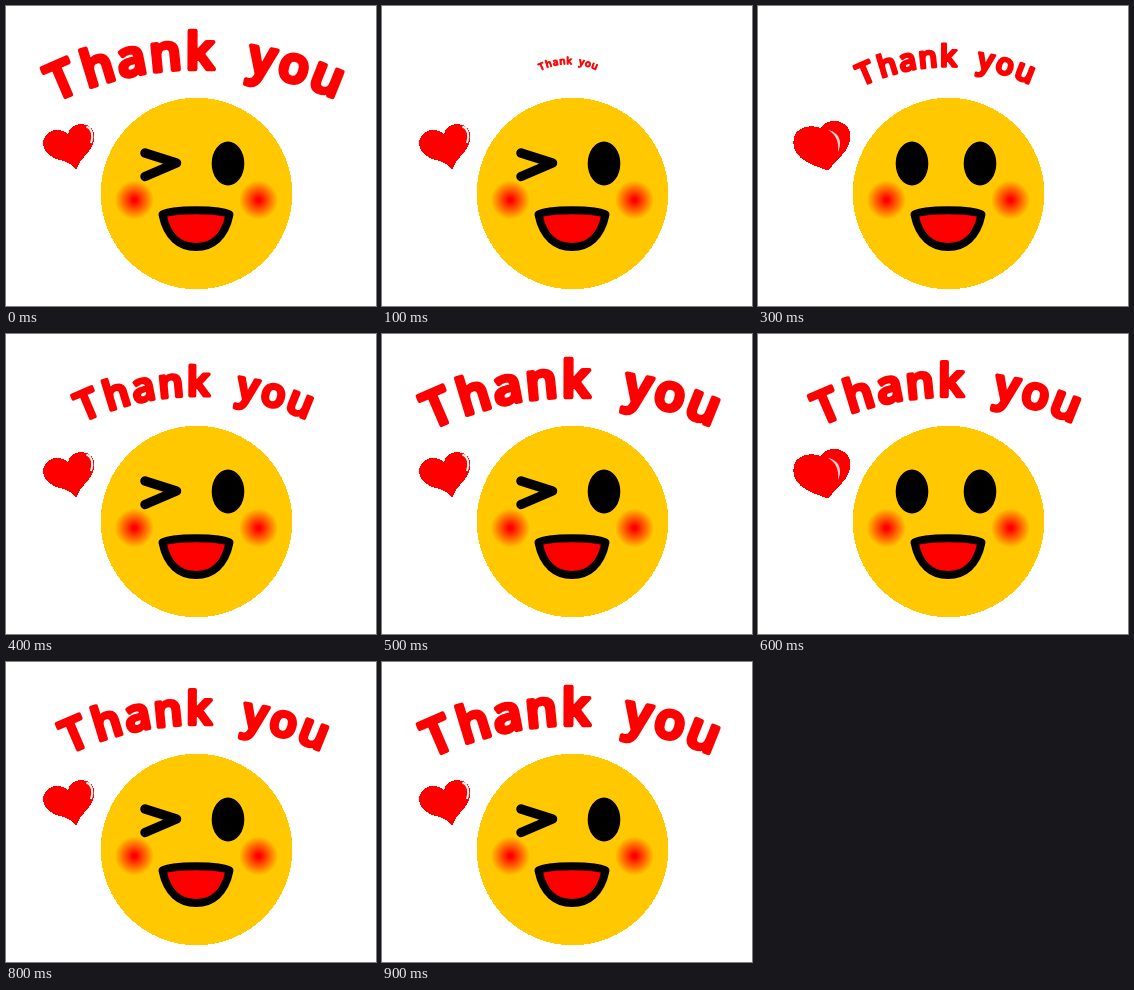
Recreate the animation shown at these times as an HTML page. Size 370 by 300 pixels, loop 1000 ms.

```html
<!DOCTYPE html>
<html lang="en">
<head>
<meta charset="utf-8">
<title>Thank you</title>
<style>
html, body { margin: 0; width: 100%; height: 100%; overflow: hidden; background: #fff; }
svg { display: block; }
text {
  font: 600 50px "Open Sans", "Noto Sans", sans-serif;
  text-anchor: middle;
  fill: red; stroke: red; stroke-width: 4.4; stroke-linejoin: round;
}
.crisp { shape-rendering: crispEdges; }
</style>
</head>
<body>
<svg width="370" height="300" viewBox="0 0 370 300">
  <defs>
    <radialGradient id="blush">
      <stop offset=".1" stop-color="#f00"/>
      <stop offset="1" stop-color="#ffc800"/>
    </radialGradient>
  </defs>

  <g id="words"></g>

  <circle class="crisp" cx="190.5" cy="187.5" r="95.8" fill="#ffc800"/>
  <circle cx="128.5" cy="194" r="19.5" fill="url(#blush)"/>
  <circle cx="252.5" cy="194" r="19.5" fill="url(#blush)"/>
  <ellipse cx="222" cy="157.5" rx="16.3" ry="22"/>
  <path d="M156.5 208.5C166 202.8 214 202.8 223.5 208.5C219 231 206 241 190 241C174 241 161 231 156.5 208.5Z"
    fill="#f00" stroke="#000" stroke-width="8" stroke-linejoin="round"/>

  <g id="wink">
    <path d="M139 147L170.5 157L139 170.5" fill="none" stroke="#000"
      stroke-width="9.5" stroke-linecap="round" stroke-linejoin="round"/>
    <path class="crisp" d="M62 128C63 121 69 118 76 118C85 118 90 126 88.5 134C86 147 74 151 70 163.5C64 155 58 156 48 152C40 148 36 142 37.5 134C40 123 56 121 62 128Z" fill="#f00"/>
    <path d="M80.5 120.5C86.500 123 87.500 130 85 137" fill="none" stroke="#fff" stroke-width="2"/>
  </g>

  <g id="open">
    <ellipse cx="154" cy="157.5" rx="16.3" ry="22"/>
    <path class="crisp" d="M63 122C66 116 74 114 81 115.5C90 118 94 126 92 134C90 147 77 154 72 163Q70 165.5 67 163.5C58 160 50 158 43 152C36 147 34 138 36 131C39 121 52 118 63 122Z" fill="#f00"/>
    <path d="M70 124C81 126 85 136 80 146C81.500 136 77.500 128 70 124Z" fill="#ffd0d0"/>
  </g>
</svg>
<script>
const $ = id => document.getElementById(id);
const CX = 185.5, CY = 57, ARC_X = 192.6, ARC_Y = 394, RADIUS = 331;
const angles = [-23.2, -16.9, -11.2, -5.5, 0.2, 5.4, 10.6, 16, 21.8];

// Each letter stands on an arc, turned about the arc's centre.
$("words").innerHTML = [..."Thank you"].map((c, i) =>
  `<text x="${ARC_X}" y="${ARC_Y - RADIUS}" transform="rotate(${angles[i]} ${ARC_X} ${ARC_Y})">${c}</text>`
).join("");

// Grow from small to full size, then pulse.
function textScale(step) {
  if (step === 0) return 1;
  if (step <= 5) return step / 5;
  return step % 2 ? 1 : 0.9;
}

function draw(now) {
  const step = Math.floor(now % 1000 / 100);
  const s = textScale(step);
  const isOpen = step % 4 >= 2;
  $("words").setAttribute("transform",
    `translate(${CX} ${CY}) scale(${s}) translate(${-CX} ${-CY})`);
  $("open").style.display = isOpen ? "" : "none";
  $("wink").style.display = isOpen ? "none" : "";
}

let start;
function tick(now) {
  start ??= now;
  draw(now - start);
  requestAnimationFrame(tick);
}
draw(0);
requestAnimationFrame(tick);
</script>
</body>
</html>
```
